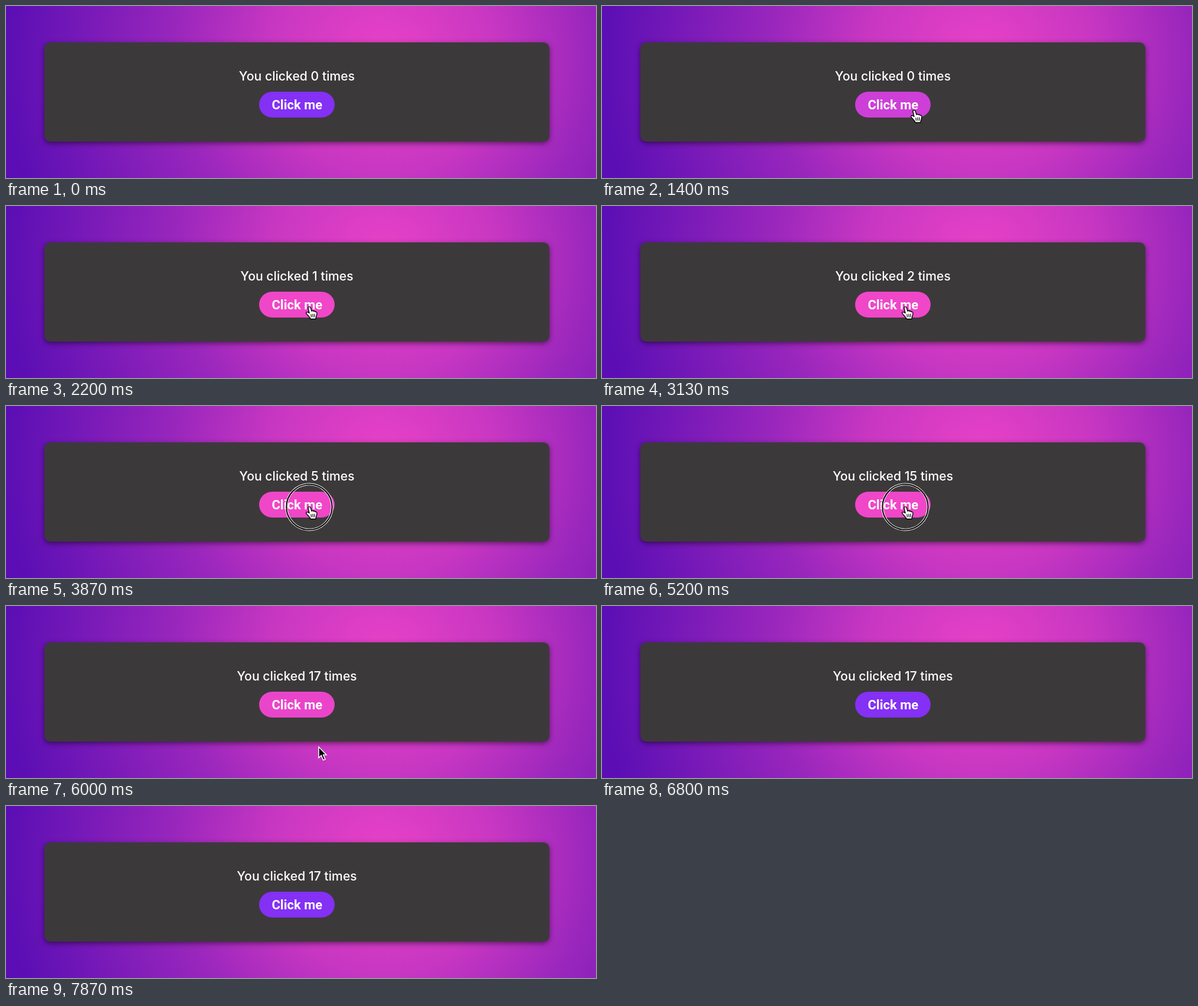
Write an HTML page that moves like this. It is 1000 px wide and 293 px high and loops after 7940 ms.

```html
<!DOCTYPE html>
<html lang="en">
<head>
<meta charset="utf-8">
<title>Click counter</title>
<style>
  html, body { margin: 0; width: 100%; height: 100%; overflow: hidden; }
  svg { display: block; width: 100vw; height: 100vh; }
  text { fill: #fff; text-anchor: middle; }
  #count { font: 500 21.2px Inter, sans-serif; }
  #label { font: 700 22px Roboto, sans-serif; }
  #card { fill: #3c393b; filter: drop-shadow(0 3px 5px rgba(0, 0, 0, .5)); }
</style>
</head>
<body>
<svg viewBox="0 0 1000 293" preserveAspectRatio="none">
  <defs>
    <radialGradient id="glow" gradientUnits="userSpaceOnUse" cx="640" cy="90" r="645">
      <stop offset="0" stop-color="#e942c6"/>
      <stop offset=".3" stop-color="#c837c2"/>
      <stop offset=".56" stop-color="#9826bc"/>
      <stop offset="1" stop-color="#5a0eb4"/>
    </radialGradient>
  </defs>
  <rect width="1000" height="293" fill="url(#glow)"/>
  <rect id="card" x="65" y="62" width="856" height="169" rx="10"/>
  <text id="count" x="493" y="126.5"></text>
  <rect id="button" x="429" y="146" width="128" height="44" rx="22"/>
  <text id="label" x="493.3" y="176">Click me</text>
  <g id="ring" fill="none">
    <circle cx="514" cy="172" r="38.7" stroke="#fff" stroke-width="4"/>
    <circle cx="514" cy="172" r="38.7" stroke="#111" stroke-width="2.2"/>
  </g>
  <g id="pointer">
    <g id="hand" stroke="#000" stroke-linejoin="round" stroke-linecap="round">
      <path fill="#fff" stroke-width="1.4" d="M-2 1.5C-2-1 1.8-1 2.4 1.2L4 7C5 5.8 7 6 7.3 7.5C8.5 6.4 10 7 10.3 8.5C12 7.5 13 9 13 11C13 15 11 17 11 20.5H2C1 16.5-3 14-5 11.2C-6 9-4 8-2 9L0 10.5Z"/>
      <path fill="none" stroke-width="1.2" d="M3 12.5l.5 4.5M6 12.2l.3 4.8M9 12.2v4.8"/>
    </g>
    <path id="arrow" stroke="#fff" stroke-width="1.5" d="M0 0V18.5L4.3 14.6L7.7 22.6L11 21.2L7.6 13.5H13Z"/>
  </g>
</svg>
<script>
const LOOP = 7940, ENTER = 1215, LEAVE = 5960, FADE = 300, PRESS = 90;
const $ = id => document.getElementById(id);
const show = (id, visible) => $(id).setAttribute('visibility', visible ? 'inherit' : 'hidden');
const mix = (a, b, p) => a + (b - a) * p;

// Two slow clicks, then a quickening burst up to 17
const clicks = Array.from({ length: 17 }, (_, i) => {
  const n = i + 1;
  if (n < 3) return 1400 + 700 * n;
  return n < 9 ? 3420 + (n - 3) * 171 : 4400 + (n - 9) * 124.3;
});

// Pointer path: time, x, y
const path = [
  [1080, 545, 300], [ENTER, 536, 190], [1400, 529, 178], [1700, 514, 172],
  [5800, 514, 172], [LEAVE, 527, 190], [6000, 530, 239], [6060, 533, 300]
];

function pointerAt(t) {
  const i = path.findIndex(key => key[0] > t);
  if (i < 1) return null;
  const [t0, x0, y0] = path[i - 1], [t1, x1, y1] = path[i];
  const p = (t - t0) / (t1 - t0);
  return [mix(x0, x1, p), mix(y0, y1, p)];
}

function fade(t, start) {
  const p = Math.min(1, Math.max(0, (t - start) / FADE));
  return p * p * (3 - 2 * p);
}

function draw(t) {
  $('count').textContent = `You clicked ${clicks.filter(c => c <= t).length} times`;
  show('ring', clicks.some(c => t >= c - PRESS && t < c));

  const hover = fade(t, ENTER) - fade(t, LEAVE);
  const purple = [132, 48, 245], pink = [240, 70, 200];
  $('button').setAttribute('fill', `rgb(${purple.map((v, i) => Math.round(mix(v, pink[i], hover)))})`);

  const position = pointerAt(t);
  const inside = t >= ENTER && t < LEAVE;
  show('pointer', position);
  show('hand', inside);
  show('arrow', !inside);
  if (position) $('pointer').setAttribute('transform', `translate(${position})`);
}

function tick() {
  draw(performance.now() % LOOP);
  requestAnimationFrame(tick);
}
tick();
</script>
</body>
</html>
```
